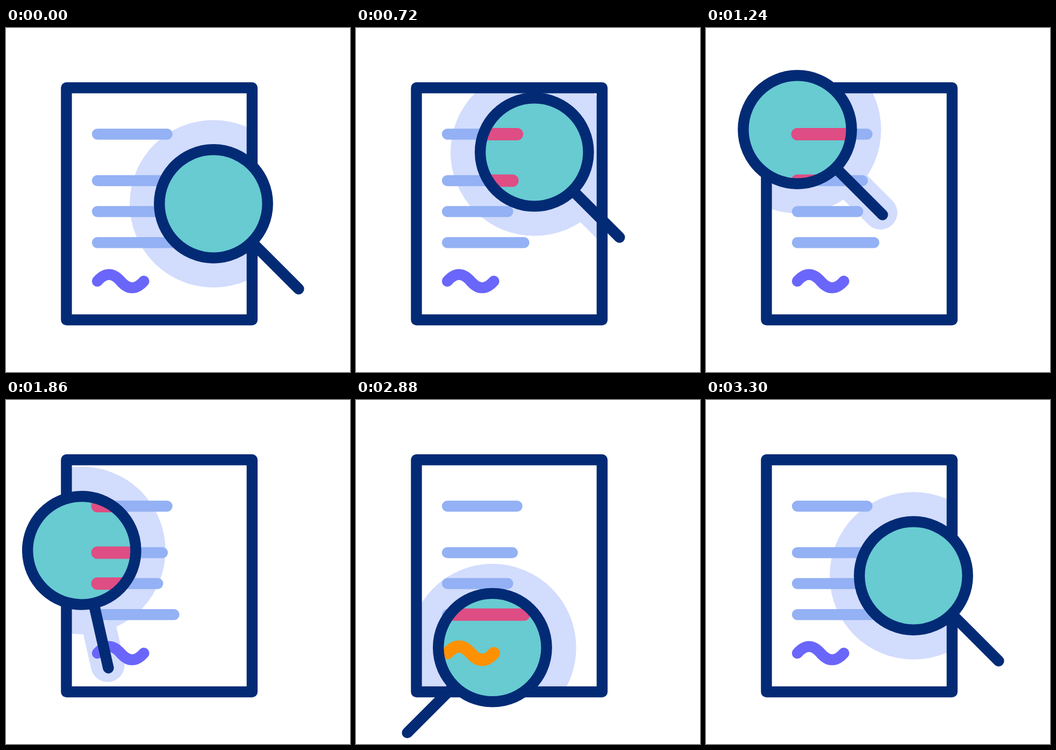
An HTML page that plays this animation: 640x640 px, repeating every 3620 ms.

```html
<!DOCTYPE html>
<html lang="en">
<head>
<meta charset="utf-8">
<title>Document search</title>
<style>
html, body { margin: 0; height: 100%; overflow: hidden; background: #fff; }
svg { display: block; width: 100%; height: 100%; }
.stroke { fill: none; stroke-width: 20.4; stroke-linecap: round; stroke-linejoin: round; }
.navy { stroke: #032b75; }
.plain { --line: #93b1f4; --sign: #6a66fa; }
.found { --line: #de4d84; --sign: #ff9100; stroke-width: 23; }
</style>
</head>
<body>
<svg viewBox="0 0 640 640">
  <defs>
    <clipPath id="page"><rect x="112" y="111" width="346" height="432"/></clipPath>
    <clipPath id="glass"><circle class="moving" r="95"/></clipPath>
    <g id="text">
      <path stroke="var(--line)" d="M170 197.5H299.6M170 284H291M170 341.5H282.3M170 399.3H312.4"/>
      <path stroke="var(--sign)" d="M170 471c14.4-16.5 28.8-16.5 43.2 0s28.8 16.5 43.2 0"/>
    </g>
  </defs>
  <g clip-path="url(#page)">
    <g class="moving" fill="#d2dcfd">
      <circle r="155.8"/>
      <path d="M0 0H218.5" stroke="#d2dcfd" stroke-width="63" stroke-linecap="round"/>
    </g>
  </g>
  <use href="#text" class="stroke plain"/>
  <rect class="stroke navy" x="112.4" y="111.2" width="345.5" height="431.8"/>
  <circle class="moving" r="100" fill="#67cbd1"/>
  <g clip-path="url(#glass)"><use href="#text" class="stroke found"/></g>
  <g class="moving stroke navy">
    <circle r="100.7"/>
    <path d="M105 0H224.1"/>
  </g>
</svg>
<script>
const LOOP = 3620, STEP = 20;
const moving = document.querySelectorAll('.moving');

const cubic = (a, b, c, d, u) => {
  const v = 1 - u;
  return a * v * v * v + 3 * b * v * v * u + 3 * c * v * u * u + d * u * u * u;
};

const ease = (x1, y1, x2, y2) => x => {
  let low = 0, high = 1;
  for (let i = 0; i < 30; i++) {
    const mid = (low + high) / 2;
    if (cubic(0, x1, x2, 1, mid) < x) low = mid; else high = mid;
  }
  return cubic(0, y1, y2, 1, low);
};

const smooth = x => x * x * (3 - 2 * x);
const glide = ease(.33, 0, .8, .9);
const swing = ease(.333, 0, .833, .833);

// Each move: time span, easing and the x and y of a Bezier path
const moves = [
  { from: 200, to: 1240, ease: glide, x: [386, 362, 282, 170], y: [327, 250, 140, 189] },
  { from: 1500, to: 2400, ease: smooth, x: [170, 109, 153.6, 211], y: [189, 263, 381, 461] },
  { from: 2700, to: 3300, ease: glide, x: [211, 288.4, 405, 386], y: [461, 473, 408, 327] }
];
const REST = 45, TURN = 91.5;

const progress = (t, from, to) => Math.min(1, Math.max(0, (t - from) / (to - from)));

function draw(now) {
  const t = Math.floor(now % LOOP / STEP) * STEP;
  const move = moves.findLast(m => t >= m.from) || moves[0];
  const u = move.ease(progress(t, move.from, move.to));
  const angle = REST + TURN * (smooth(progress(t, 1500, 2400)) - swing(progress(t, 2840, 3300)));
  const pose = `translate(${cubic(...move.x, u)} ${cubic(...move.y, u)}) rotate(${angle})`;
  moving.forEach(part => part.setAttribute('transform', pose));
}

const start = performance.now();
function tick() {
  draw(performance.now() - start);
  requestAnimationFrame(tick);
}
tick();
</script>
</body>
</html>
```
